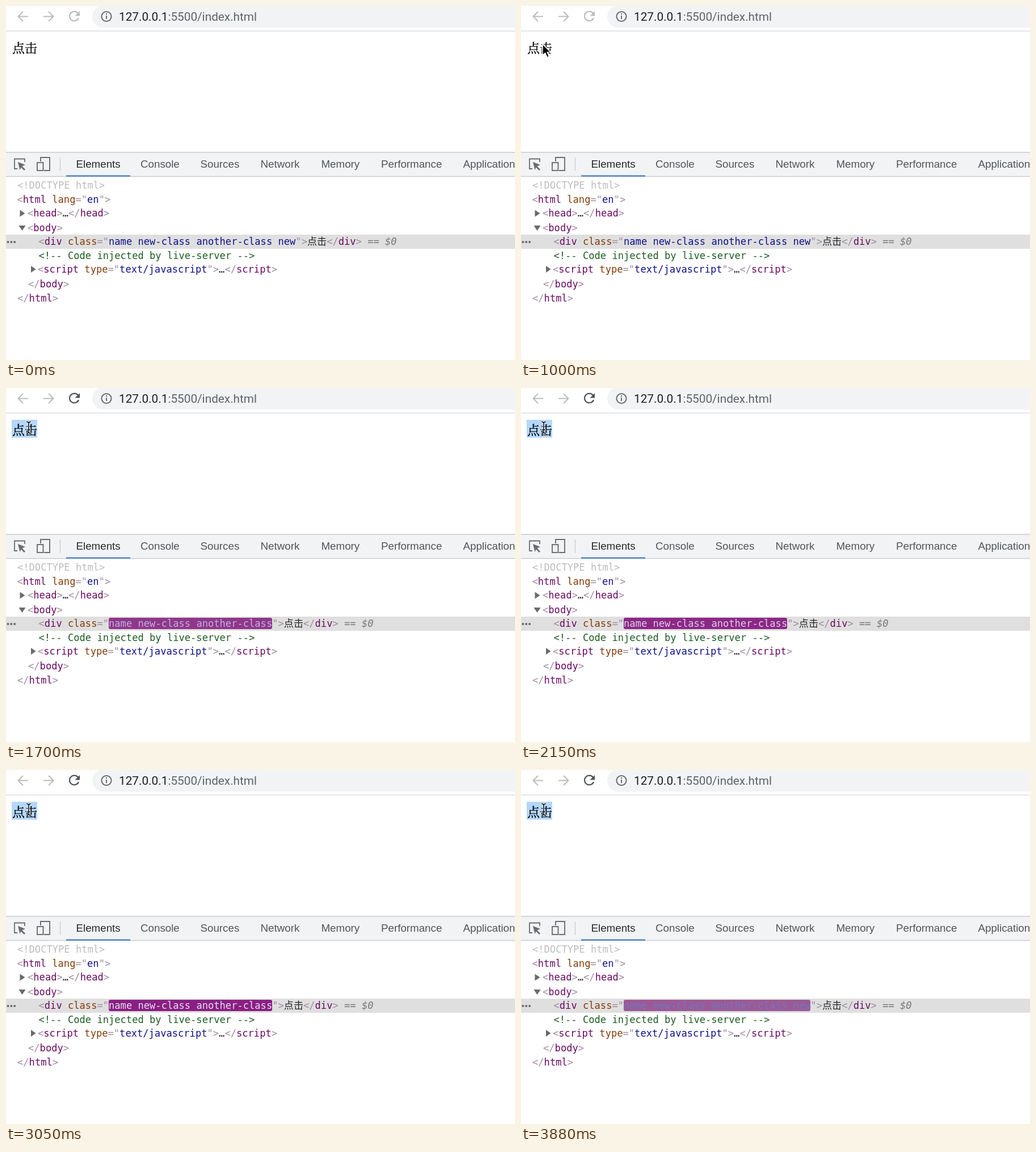
Recreate the animation shown at these times as an HTML page. Size 897 px wide and 624 px high, loop 3.97 s.

```html
<!DOCTYPE html>
<html lang="zh">
<head>
<meta charset="utf-8">
<title>DOM inspector</title>
<style>
  html, body { margin: 0; width: 100%; height: 100%; overflow: hidden; background: #fff; }
  svg { display: block; }
  text { white-space: pre; }
  .url { font: 20.75px Roboto, sans-serif; fill: #5f6368; }
  .url .host { fill: #1c1d20; }
  .page { font: 22px "Noto Serif CJK SC", "Noto Serif SC", "Noto Sans CJK SC", serif; fill: #000; stroke: #000; stroke-width: .35; }
  .tabs { font: 18.75px "Liberation Sans", Arial, sans-serif; fill: #525559; }
  .tabs .on { fill: #26282b; }
  .code { font: 17.1px "DejaVu Sans Mono", "Noto Sans CJK SC", monospace; fill: #a08c9e; }
  .tag { fill: #6a0a62; }
  .attr { fill: #843c08; }
  .val { fill: #10108a; }
  .plain { fill: #262626; }
  .note { fill: #1b5c20; }
  .doctype { fill: #bcbcbc; }
  .ref { fill: #777; }
  .line { fill: none; stroke: #6a6d71; stroke-width: 2; }
</style>
</head>
<body>
<svg width="897" height="624" viewBox="0 0 897 624">
  <defs>
    <path id="beamShape" d="M36.500 59.500Q39.500 59.500 40 62Q40.500 59.500 43.500 59.500M40 62V77.500M36.500 80Q39.500 80 40 77.500Q40.500 80 43.500 80M37.500 73.500H42.500"/>
  </defs>

  <!-- Address bar -->
  <g class="line" style="stroke:#babcbe">
    <path d="M39 18.500H22M30 10L21.500 18.500L30 27"/>
    <path d="M66 18.500H83M75 10L83.500 18.500L75 27"/>
  </g>
  <g id="reload">
    <path d="M127 13A8.300 8.300 0 1 0 128 21" fill="none" stroke="currentColor" stroke-width="2.200"/>
    <path d="M130 9V17.500H121.500Z" fill="currentColor"/>
  </g>
  <rect x="152" y="-1" width="800" height="39" rx="19.500" fill="#f1f3f4"/>
  <g class="line">
    <circle cx="177" cy="18.500" r="8.600"/>
    <path d="M177 17V23M177 13V15.200"/>
  </g>
  <text class="url" x="199" y="25.500"><tspan class="host">127.0.0.1</tspan>:5500/index.html</text>
  <rect y="43.500" width="897" height="1.300" fill="#d8dadd"/>

  <!-- Page -->
  <rect id="selection" x="10" y="56" width="45" height="31.500" fill="#b4d7ff"/>
  <text class="page" x="11" y="82">点击</text>

  <!-- Tool tabs -->
  <rect y="257.500" width="897" height="43" fill="#f1f3f4"/>
  <path d="M0 258H897M0 300.500H897" stroke="#c9ccd0" stroke-width="1.300"/>
  <g class="line">
    <path d="M20 287H15V269.500H33V275" stroke-width="1.800"/>
    <path d="M21 275L34 280L28.500 282.500L34 288L32 290L26.500 284.500L24.500 289Z" fill="#6a6d71" stroke="none"/>
    <path d="M61 274V267H77V290H67" stroke-width="1.900"/>
    <rect x="55" y="276" width="10.500" height="14" stroke-width="1.900"/>
  </g>
  <path d="M95.500 267V291" stroke="#c9ccd0" stroke-width="1.300"/>
  <g class="tabs">
    <text class="on" x="123.500" y="285">Elements</text>
    <text x="237" y="285">Console</text>
    <text x="342.500" y="285">Sources</text>
    <text x="448.500" y="285">Network</text>
    <text x="555.500" y="285">Memory</text>
    <text x="661" y="285">Performance</text>
    <text x="805.500" y="285">Application</text>
  </g>
  <rect x="106" y="298.500" width="113" height="2" fill="#3574c8"/>

  <!-- Element tree -->
  <rect y="403" width="897" height="25" fill="#dfdfdf"/>
  <g fill="#6a6a6a">
    <circle cx="3.500" cy="416" r="2"/><circle cx="9.300" cy="416" r="2"/><circle cx="15.100" cy="416" r="2"/>
    <path d="M24.500 359.500V371.500L33.500 365.500ZM22.500 387H34.500L28.500 396ZM44 458V470L52.500 464Z"/>
  </g>
  <rect id="flash" x="181" y="405" height="20" rx="3"/>
  <g class="code">
    <text class="doctype" x="20" y="322">&lt;!DOCTYPE html&gt;</text>
    <text x="19.500" y="347">&lt;<tspan class="tag">html</tspan> <tspan class="attr">lang</tspan>="<tspan class="val">en</tspan>"&gt;</text>
    <text x="38" y="371">&lt;<tspan class="tag">head</tspan>&gt;<tspan class="plain">…</tspan>&lt;/<tspan class="tag">head</tspan>&gt;</text>
    <text x="38" y="397">&lt;<tspan class="tag">body</tspan>&gt;</text>
    <text x="57.500" y="421">&lt;<tspan class="tag">div</tspan> <tspan class="attr">class</tspan>="<tspan id="names" class="val">name new-class another-class new</tspan>"&gt;<tspan class="plain">点击</tspan>&lt;/<tspan class="tag">div</tspan>&gt;<tspan class="ref"> == <tspan font-style="italic">$0</tspan></tspan></text>
    <text class="note" x="57.500" y="446">&lt;!-- Code injected by live-server --&gt;</text>
    <text x="56" y="470">&lt;<tspan class="tag">script</tspan> <tspan class="attr">type</tspan>="<tspan class="val">text/javascript</tspan>"&gt;<tspan class="plain">…</tspan>&lt;/<tspan class="tag">script</tspan>&gt;</text>
    <text x="39" y="495.500">&lt;/<tspan class="tag">body</tspan>&gt;</text>
    <text x="20" y="521">&lt;/<tspan class="tag">html</tspan>&gt;</text>
  </g>

  <!-- Pointers -->
  <path id="arrow" d="M0 0V20L4.600 15.800L8 23.500L11.400 22L8.200 14.500H14.300Z" fill="#000" stroke="#fff" stroke-width="1.500" stroke-linejoin="round"/>
  <g id="beam" fill="none" stroke-linecap="round">
    <use href="#beamShape" stroke="#fff" stroke-width="3"/>
    <use href="#beamShape" stroke="#111" stroke-width="1.600"/>
  </g>
</svg>
<script>
  const LOOP = 3970, STEP = 50, LAST_MOVE = 3800, LAST_FADE = 3880;
  const FADE = 830, ACTIVATE = 1100;
  const CLICKS = [1450, 1750, 2000, 2300, 2550, 2750, 2950, 3400];
  const [reload, selection, flash, names, arrow, beam] =
    ['reload', 'selection', 'flash', 'names', 'arrow', 'beam'].map(id => document.getElementById(id));

  const clamp = v => Math.min(1, Math.max(0, v));
  const mix = (a, b, p) => a + (b - a) * p;
  const blend = (a, b, p) => `rgb(${a.map((v, i) => Math.round(mix(v, b[i], p)))})`;
  const show = (node, on) => { node.style.display = on ? '' : 'none'; };

  function movePointer(t) {
    const p = clamp((t - 50) / 500);
    const glide = p * p * (3 - 2 * p);
    const settle = clamp((t - 550) / 150);
    const x = mix(706, 34, glide) + 4 * settle;
    const y = mix(496, 82, glide) - 15 * settle;
    arrow.setAttribute('transform', `translate(${x} ${y})`);
    show(arrow, t >= 50 && t < ACTIVATE);
    show(beam, t >= ACTIVATE);
  }

  function updateClass(t) {
    const count = CLICKS.filter(c => c <= t).length;
    const short = count % 2 === 1;
    const label = 'name new-class another-class' + (short ? '' : ' new');
    if (names.textContent !== label) names.textContent = label;
    show(selection, count);
    show(flash, count);
    const p = count ? clamp((t - CLICKS[count - 1]) / FADE) : 1;
    flash.setAttribute('width', short ? 288 : 329);
    flash.style.fill = blend([134, 16, 126], [172, 150, 172], p * 0.95);
    names.style.fill = blend([255, 255, 255], [16, 16, 138], p);
  }

  function draw(time) {
    const t = time >= LAST_FADE ? LAST_FADE : Math.min(LAST_MOVE, Math.floor(time / STEP) * STEP);
    reload.style.color = t < ACTIVATE ? '#babcbe' : '#505357';
    movePointer(t);
    updateClass(t);
  }

  const start = performance.now();
  function tick() {
    draw((performance.now() - start) % LOOP);
    requestAnimationFrame(tick);
  }
  tick();
</script>
</body>
</html>
```
